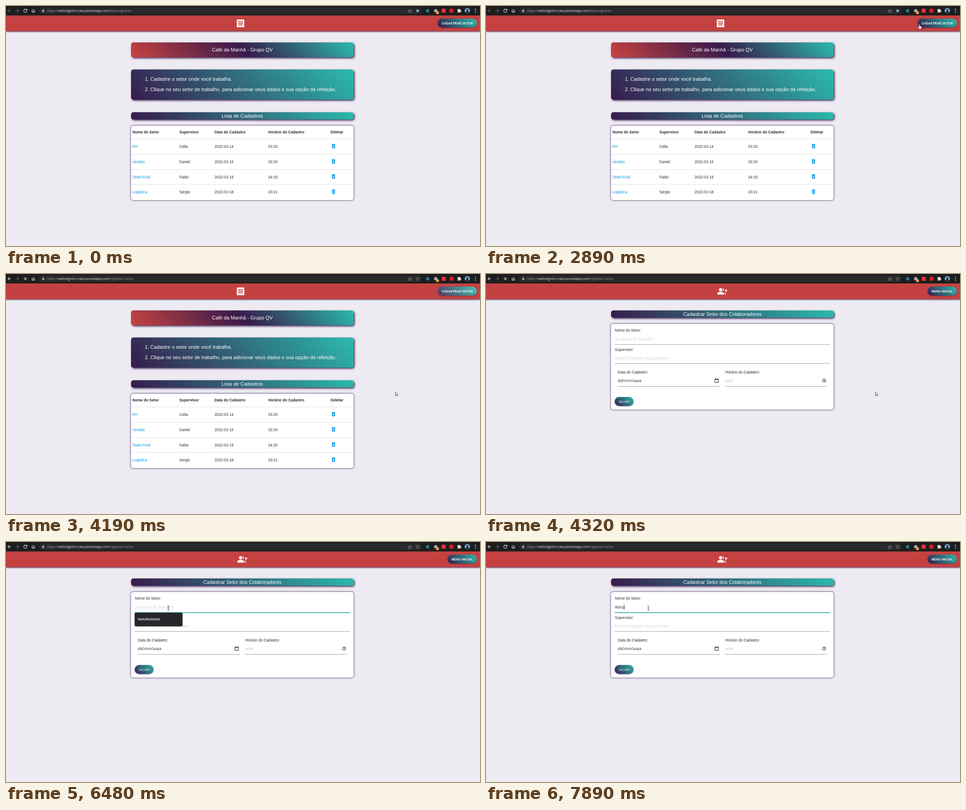
Animation, 1050 px wide and 533 px high, one loop 8 s. Source, as an HTML page:

```html
<!DOCTYPE html>
<html lang="pt">
<head>
<meta charset="utf-8">
<style>
  html, body { margin: 0; width: 100%; height: 100%; overflow: hidden; background: #edeaf1; }
  div, svg { position: absolute; }
  svg { left: 0; top: 0; width: 1050px; height: 533px; }
  text { font-family: "Liberation Sans", Arial, sans-serif; white-space: pre; }
  .ui { font-family: "Open Sans", "Noto Sans", sans-serif; }
  .nav { background: #c34241; box-shadow: 0 1px 3px #371b4f; }
  .teal { background: linear-gradient(45deg, #371a4b, #2bbbad); }
  .trio { background: linear-gradient(45deg, #c84440, #371a4b, #2bbbad); }
  .banner { border-radius: 5px; box-shadow: 2px 2px 4px #371b4f; }
  .card { border-radius: 5px; background: #fff; box-shadow: 0 0 4px #371b4f; }
  .button { border-radius: 10px; box-shadow: 0 1px 2px #371b4f90; }
  .glow { border-radius: 10px; background: #fff; }
  .menu { border-radius: 3px; background: #26262b; box-shadow: 0 1px 2px #0006; }
</style>
</head>
<body>
<div id="listPage"></div>
<div id="formPage"></div>
<svg id="browser"></svg>
<svg id="pointer"></svg>
<script>
const LOOP = 8000;
const $ = id => document.getElementById(id);
const show = (id, on) => { $(id).style.visibility = on ? 'inherit' : 'hidden'; };

const box = (x, y, w, h, cls, id = '') =>
  `<div id="${id}" class="${cls}" style="left:${x}px;top:${y}px;width:${w}px;height:${h}px"></div>`;
// y is the middle of the capital letters
const text = (x, y, str, size, attrs = '') =>
  `<text x="${x}" y="${y + size * .36}" font-size="${size}" ${attrs}>${str}</text>`;
const icon = (d, cx, cy, size, attrs = 'fill="#fff"') =>
  `<path d="${d}" transform="translate(${cx - size / 2} ${cy - size / 2}) scale(${size / 24})" ${attrs}/>`;
const line = (x, y, w, color, attrs = '') =>
  `<rect x="${x}" y="${y}" width="${w}" height="1" fill="${color}" ${attrs}/>`;

const DARK = 'fill="#2c2c2c"', WHITE = 'fill="#fff"', BLUE = 'fill="#039be5"';
const CENTER = 'fill="#fff" text-anchor="middle"';
const BOLD = 'font-weight="bold"';
const CAPS = 'fill="#fff" letter-spacing=".275"';
const HINT = 'fill="#d1d1d1" class="ui"';

const ICON = {
  back: 'M20 11H7.83l5.59-5.59L12 4l-8 8 8 8 1.41-1.41L7.83 13H20z',
  forward: 'M4 11h12.17l-5.59-5.59L12 4l8 8-8 8-1.41-1.41L16.17 13H4z',
  reload: 'M17.65 6.35C16.2 4.9 14.21 4 12 4c-4.42 0-8 3.58-8 8s3.58 8 8 8c3.73 0 6.84-2.55 7.73-6h-2.08c-.82 2.33-3.04 4-5.65 4-3.31 0-6-2.69-6-6s2.69-6 6-6c1.66 0 3.14.69 4.22 1.78L13 11h7V4z',
  stop: 'M19 6.41L17.59 5 12 10.59 6.41 5 5 6.41 10.59 12 5 17.59 6.41 19 12 13.41 17.59 19 19 17.59 13.41 12z',
  home: 'M3 12l9-8 9 8M6 10v10h4v-6h4v6h4V10',
  share: 'M8 8H3v13h16v-5M7 16c1-6 5-7 9-7V5l6 6-6 6v-4c-4 0-7 0-9 3z',
  star: 'M12 17.27L18.18 21l-1.64-7.03L22 9.24l-7.19-.61L12 2 9.19 8.63 2 9.24l5.46 4.73L5.82 21z',
  puzzle: 'M20.5 11H19V7c0-1.1-.9-2-2-2h-4V3.5a2.5 2.5 0 0 0-5 0V5H4a2 2 0 0 0-2 2v3.8h1.5a2.7 2.7 0 0 1 0 5.4H2V20a2 2 0 0 0 2 2h3.8v-1.5a2.7 2.7 0 0 1 5.4 0V22H17a2 2 0 0 0 2-2v-4h1.5a2.5 2.5 0 0 0 0-5z',
  receipt: 'M18 17H6v-2h12zm0-4H6v-2h12zm0-4H6V7h12zM3 22' + 'l1.5-1.5 1.5 1.5'.repeat(6) + 'V2' + 'l-1.5 1.5-1.5-1.5'.repeat(6) + 'z',
  people: 'M22 9V7h-2v2h-2v2h2v2h2v-2h2V9zM8 12a4 4 0 1 0 0-8 4 4 0 0 0 0 8zm0 1c-2.67 0-8 1.34-8 4v3h16v-3c0-2.66-5.33-4-8-4zM12.51 4.05a6 6 0 0 1 0 7.9 4 4 0 0 0 0-7.9zM16.53 13.83C17.42 14.66 18 15.7 18 17v3h2v-3c0-1.45-1.59-2.51-3.47-3.17z',
  trash: 'M6 19c0 1.1.9 2 2 2h8c1.1 0 2-.9 2-2V7H6zm2.46-7.12l1.41-1.41L12 12.59l2.12-2.12 1.41 1.41L13.41 14l2.12 2.12-1.41 1.41L12 15.41l-2.12 2.12-1.41-1.41L10.59 14zM15.5 4l-1-1h-5l-1 1H5v2h14V4z'
};

// Page with the list of sectors
const columns = [280, 384, 462, 581, 719];
const headings = ['Nome do Setor', 'Supervisor', 'Data do Cadastro', 'Horário do Cadastro', 'Deletar'];
const rows = [
  ['RH', 'Celia', '2022-02-14', '03:20'],
  ['Vendas', 'Daniel', '2022-02-15', '02:20'],
  ['Teste Final', 'Fabio', '2022-02-19', '04:20'],
  ['Logistica', 'Sergio', '2022-02-18', '03:21']
];
$('listPage').innerHTML =
  box(0, 21, 1050, 35, 'nav') + box(956, 28, 87, 20, 'teal button') + box(956, 28, 87, 20, 'glow', 'glow') +
  box(277, 81, 493, 33, 'trio banner') + box(277, 141, 493, 67, 'teal banner') +
  box(277, 236, 493, 16, 'teal banner') + box(277, 266, 493, 165, 'card') +
  '<svg>' + icon(ICON.receipt, 519.5, 38.5, 22) +
  text(965, 38.5, 'CADASTRAR SETOR', 6.5, CAPS + BOLD) +
  text(523.5, 97.5, 'Café da Manhã - Grupo QV', 11, CENTER) +
  text(307.5, 162, '1. Cadastre o setor onde você trabalha.', 11, WHITE) +
  text(307.5, 185.3, '2. Clique no seu setor de trabalho, para adicionar seus dados e sua opção de refeição.', 11, WHITE) +
  text(523.5, 244, 'Lista de Cadastros', 11, CENTER) +
  headings.map((h, i) => text(columns[i], 280.5, h, 8.25, DARK + BOLD)).join('') +
  rows.map((row, r) => {
    const y = 312.3 + r * 33.7;
    return line(277, Math.round(y - 17), 493, '#e2e2e2') +
      row.map((cell, i) => text(columns[i], y, cell, 8.25, i ? DARK : BLUE)).join('') +
      icon(ICON.trash, 725.5, y - 1.2, 13.2, BLUE);
  }).join('') + '</svg>';

// Page with the form
$('formPage').innerHTML =
  box(0, 21, 1050, 35, 'nav') + box(978, 28, 65, 20, 'teal button') +
  box(277, 81, 493, 16, 'teal banner') + box(277, 111, 493, 190, 'card') + box(285, 273, 42, 20, 'teal button') +
  '<svg>' + icon(ICON.people, 523.5, 38.5, 22) +
  text(987, 38.5, 'MENU INICIAL', 6.5, CAPS + BOLD) +
  text(523.5, 89.3, 'Cadastrar Setor dos Colaboradores', 11, CENTER) +
  text(285.5, 125.5, 'Nome do Setor:', 8.25, DARK) +
  text(285.5, 145, 'Seu Setor de Trabalho', 8.4, HINT + ' id="hint"') +
  text(285.5, 145, '', 8.5, 'fill="#222" class="ui" id="typed"') +
  '<rect id="caret" y="139" width="1" height="11" fill="#222"/>' +
  text(285.5, 168, 'Supervisor:', 8.25, DARK) +
  text(285.5, 187, 'Nome Completo do Supervisor', 8.4, HINT) +
  text(292, 217.7, 'Data do Cadastro:', 8.25, DARK) +
  text(530, 217.7, 'Horário do Cadastro:', 8.25, DARK) +
  text(292, 237, 'dd/mm/aaaa', 8.4, 'fill="#222" class="ui" letter-spacing=".18"') +
  text(530, 237, '--:--', 8.4, 'fill="#222" class="ui" letter-spacing=".9"') +
  line(285, 156, 477, '#a0a0a0') + line(285, 198, 477, '#a0a0a0') +
  line(292, 249, 226, '#a0a0a0') + line(530, 249, 226, '#a0a0a0') +
  '<rect id="focus" x="285" y="156" width="477" height="1.6" fill="#26a69a"/>' +
  '<path d="M507 233.5h8v7h-8zM507 234h8M509 232v1M513 232v1" fill="none" stroke="#111"/>' +
  '<path d="M752.5 236.7a3.5 3.5 0 1 0-7 0 3.5 3.5 0 0 0 7 0M749 234.5v2.4l1.6 1" fill="none" stroke="#111"/>' +
  text(294, 283.5, 'SALVAR', 6.5, CAPS + 'class="ui"') + '</svg>' +
  '<div id="suggest">' + box(285, 157, 106, 30, 'menu') +
  '<svg>' + text(292, 172, 'fdsfsdfdsfsdfsd', 6.6, WHITE + 'class="ui" font-weight="600"') + '</svg></div>';

// Browser toolbar
const GREY = 'fill="#9aa0a6"', LIGHT = 'fill="#e8eaed"';
const outline = color => `fill="none" stroke="${color}" stroke-width="2"`;
const spot = (x, r, color, y = 10.5) => `<circle cx="${x}" cy="${y}" r="${r}" fill="${color}"/>`;
$('browser').innerHTML =
  '<rect width="1050" height="21" fill="#1d1d1e"/><rect x="73" y="3" width="848" height="15" rx="7.5" fill="#29292a"/>' +
  icon(ICON.back, 7.5, 10.5, 12, 'id="back"') + icon(ICON.forward, 25, 10.5, 12, 'fill="#6a6b6d"') +
  icon(ICON.reload, 43, 10.5, 12.5, LIGHT + 'id="reload"') + icon(ICON.stop, 43, 10.5, 13, LIGHT + 'id="stop"') +
  icon(ICON.home, 60.5, 10.5, 11, outline('#e8eaed')) +
  '<path d="M80 9.5h5v4h-5z" fill="#9aa0a6"/><path d="M81 9.5V8.4a1.5 1.5 0 0 1 3 0v1.1" fill="none" stroke="#9aa0a6"/>' +
  text(91, 10.6, '<tspan>https://</tspan><tspan fill="#e8eaed">webregistro-nata.pluvokapp.com</tspan><tspan id="path"></tspan>', 7.35, GREY + 'class="ui"') +
  icon(ICON.share, 894.5, 10.5, 10, outline('#8b9095')) +
  icon(ICON.star, 911.8, 10.5, 10, 'id="star" stroke-width="2"') +
  spot(934, 3.8, '#1f7f8c') + spot(952, 3.8, '#a9abae') +
  '<rect x="953" y="12" width="6" height="6" rx="1" fill="#f0a13a"/><rect x="965" y="6" width="9" height="9" rx="1" fill="#e0353a"/>' +
  spot(987, 4.8, '#e01e1e') + icon(ICON.puzzle, 1004, 10.5, 10, LIGHT) +
  spot(1022, 6, '#6fb4dc') + spot(1022, 2.2, '#243446', 8.8) +
  '<path d="M1018 14.9a4 4 0 0 1 8 0 6 6 0 0 1-8 0" fill="#243446"/>' +
  [7, 10.5, 14].map(y => spot(1040, 1, '#e8eaed', y)).join('');

$('pointer').innerHTML =
  '<path id="arrow" d="M.5.5v8.6l2-1.8 1.4 3.1 1.5-.7L4 6.7h2.6z" fill="#fff" stroke="#222" stroke-width=".8"/>' +
  '<path id="hand" d="M-1 1q1-1.6 2 0v3.2l3 .7q1.2.4 1 1.8L4.3 11H-.6L-3 7.2q.3-1.4 2 0z" fill="#fff" stroke="#222" stroke-width=".7"/>' +
  '<path id="beam" d="M-2-4.5h1.5L0-4l.5-.5H2M0-4v8M-2 4.5h1.5L0 4l.5.5H2" fill="none" stroke="#222" stroke-width=".9"/>';

// Each move: start, end, number of positions held, way points
const moves = [
  [910, 1470, 9, [[1016, 517], [958, 440], [908, 366], [882, 332], [877, 325]]],
  [2400, 3170, 12, [[875, 321], [864, 300], [862, 265], [872, 215], [892, 160], [918, 105], [943, 62], [960, 40], [970, 39], [978, 39], [983, 38], [985, 38]]],
  [3510, 4120, 10, [[978, 52], [940, 120], [895, 205], [868, 250], [862, 261]]],
  [4780, 5410, 10, [[850, 258], [740, 232], [560, 190], [415, 152], [362, 138], [350, 135]]],
  [5670, 5880, 4, [[352, 138], [359.5, 147]]]
];

function pointerAt(t) {
  const move = moves.filter(m => m[0] <= t).pop();
  if (!move) return null;
  const [start, end, count, points] = move;
  const step = Math.min(count - 1, Math.floor((t - start) / (end - start) * (count - 1) + 1e-6));
  const u = step / (count - 1) * (points.length - 1);
  const i = Math.min(Math.floor(u), points.length - 2);
  return points[i].map((v, k) => v + (points[i + 1][k] - v) * (u - i));
}

const ramp = (t, start, length) => Math.max(0, Math.min(1, (t - start) / length));

function draw(t) {
  const form = t >= 4320, visited = t >= 4190, loading = t >= 3510 && t < 4520;
  $('listPage').style.display = form ? 'none' : '';
  $('formPage').style.display = form ? '' : 'none';

  show('stop', loading);
  show('reload', !loading);
  $('back').setAttribute('fill', visited ? '#e8eaed' : '#6a6b6d');
  $('star').setAttribute('fill', visited ? 'none' : '#74b9f7');
  $('star').setAttribute('stroke', visited ? '#8b9095' : 'none');
  $('path').textContent = visited ? '/registrar-turno' : '/lista-registros';
  $('glow').style.opacity = .12 * ramp(t, 2890, 280);

  $('focus').style.opacity = ramp(t, 5950, 200);
  show('suggest', t >= 6020 && t < 7150);
  const typed = 'Almo'.slice(0, [7080, 7290, 7690, 7890].filter(at => t >= at).length);
  $('typed').textContent = typed;
  show('hint', !typed);
  show('caret', t >= 5950 && !(t >= 6480 && t < 7010));
  $('caret').setAttribute('x', 285 + (typed ? $('typed').getComputedTextLength() : 0));

  const at = pointerAt(t);
  let kind = '';
  if (at) {
    const [x, y] = at;
    kind = 'arrow';
    if (!form && x > 956 && x < 1043 && y > 28 && y < 48) kind = 'hand';
    if (form && x > 285 && x < 762 && y > 131 && y < 157) kind = 'beam';
    $(kind).setAttribute('transform', `translate(${x} ${y})`);
  }
  for (const name of ['arrow', 'hand', 'beam']) show(name, name === kind);
}

function tick() {
  draw(performance.now() % LOOP);
  requestAnimationFrame(tick);
}
tick();
</script>
</body>
</html>
```
